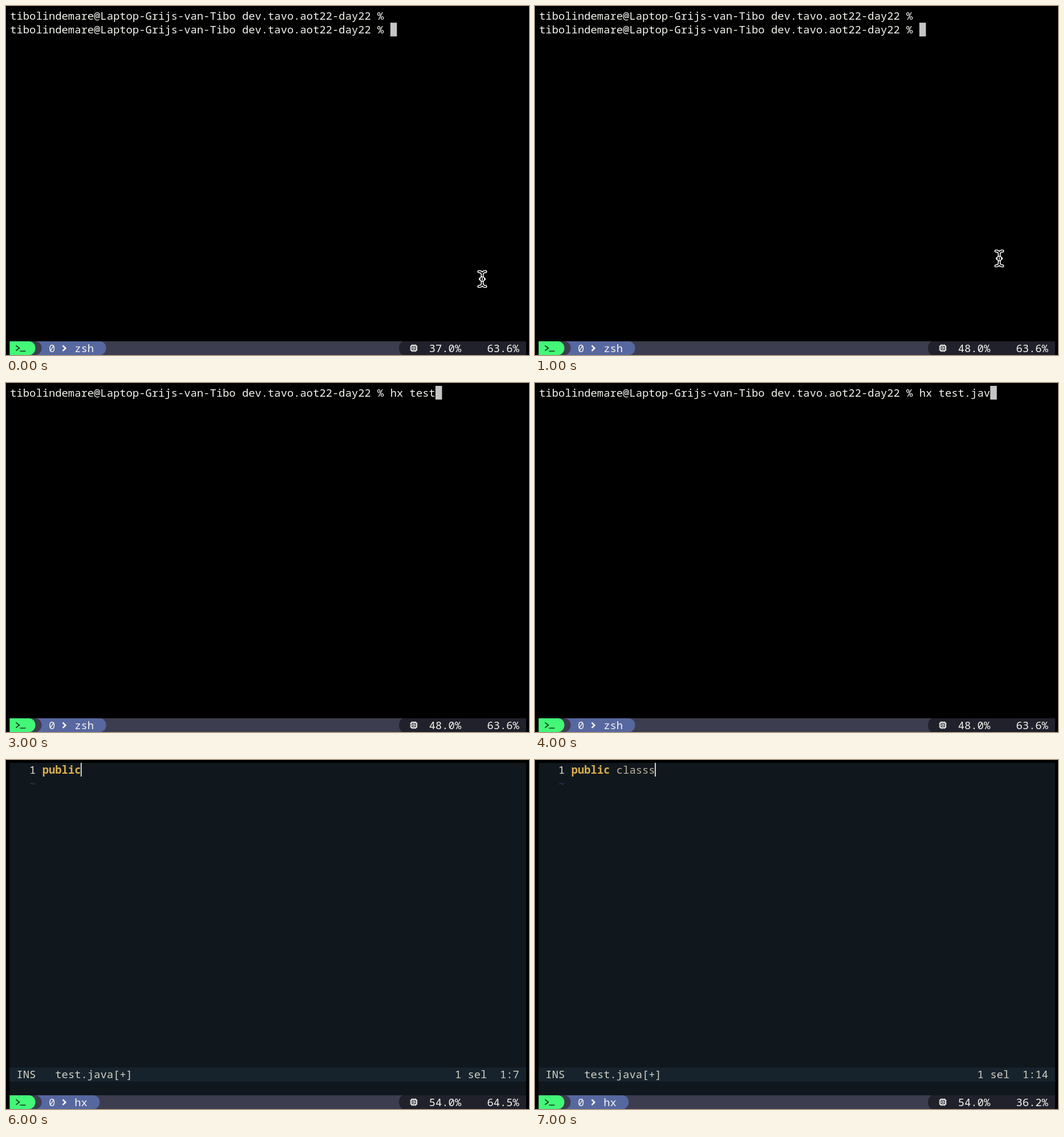
Write an HTML page that moves like this. It is 917 px wide and 611 px high and loops after 8000 ms.

```html
<!DOCTYPE html>
<html lang="en">
<head>
<meta charset="utf-8">
<title>Terminal</title>
<style>
  html, body { margin: 0; width: 100%; height: 100%; overflow: hidden; background: #000; }
  svg { display: block; width: 917px; height: 611px; }
  text { font: 18.83px "Noto Sans Mono", "DejaVu Sans Mono", monospace; white-space: pre; }
  .bold { font-weight: 700; }
</style>
</head>
<body>
<svg id="stage" viewBox="0 0 917 611"></svg>
<script>
const CELL = 11.3, ROW = 24.25, LEFT = 7.2, TOP = 5;
const LOOP = 8000;
const PROMPT = 'tibolindemare@Laptop-Grijs-van-Tibo dev.tavo.aot22-day22 % ';

// Each step holds until the next one; values carry over.
const STEPS = [
  { at: 0, lines: ['', ''], mouse: [835, 478], tab: 'zsh', cpu: '37.0%', ram: '63.6%' },
  { at: 1000, mouse: [814, 442], cpu: '48.0%' },
  { at: 2000, lines: [''] },
  { at: 3000, lines: ['hx test'], mouse: null },
  { at: 4000, lines: ['hx test.jav'] },
  { at: 5000, code: '', ram: '64.5%' },
  { at: 6000, code: 'public', tab: 'hx', cpu: '54.0%' },
  { at: 7000, code: 'public classs', ram: '36.2%' }
];

const stage = document.getElementById('stage');
const colX = c => LEFT + c * CELL;
const rowY = r => TOP + r * ROW;

const rect = (x, y, w, h, fill) =>
  `<rect x="${x}" y="${y}" width="${w}" height="${h}" fill="${fill}"/>`;
const text = (col, row, str, fill = '#f4f4ee', cls = '') =>
  `<text x="${colX(col)}" y="${rowY(row) + 18.8}" fill="${fill}" class="${cls}">${str}</text>`;
const line = (d, color, width) =>
  `<path d="${d}" fill="none" stroke="${color}" stroke-width="${width}"/>`;

// Bar segment with a rounded right end.
const pill = (x, end, fill) =>
  `<path d="M${x} 587H${end - 11}a11 12 0 0 1 0 24H${x}z" fill="${fill}"/>`;

function shell(lines) {
  const last = lines.length - 1;
  return lines.map((cmd, i) => text(0, i, PROMPT + cmd)).join('') +
    rect(colX(PROMPT.length + lines[last].length), rowY(last), 11.5, 24, '#c6c5c4');
}

function editor(code) {
  const ink = '#d2d1c5';
  const pos = `1 sel  1:${code.length + 1}`;
  const [word, rest] = [code.slice(0, 6), code.slice(6)];
  return rect(6.5, 5, 905.5, 582, '#10171d') +
    rect(6.5, rowY(22), 905.5, 24.5, '#17232c') +
    text(3, 0, '1', '#e2e1d8') + text(3, 1, '~', '#38404a') +
    text(5, 0, word, '#d9ae4c', 'bold') + text(11, 0, rest, '#b9b29b') +
    rect(colX(5 + code.length) - 0.7, 5, 2, 24, '#d8d8d4') +
    text(1, 22, 'INS', ink) +
    text(7, 22, 'test.java' + (code ? '[+]' : ''), ink) +
    text(79 - pos.length, 22, pos, ink);
}

function chip() {
  let pins = '';
  for (const d of [-3, 0, 3])
    pins += `M${715 + d} 592.5v13M708.5 ${599 + d}h13`;
  return line(pins, '#f4f4ee', 1.3) +
    '<rect x="710.5" y="594.5" width="9" height="9" rx="1" fill="#20212b" stroke="#f4f4ee" stroke-width="1.8"/>' +
    '<rect x="713.4" y="597.4" width="3.2" height="3.2" fill="none" stroke="#f4f4ee" stroke-width="1.3"/>';
}

function statusBar({ tab, cpu, ram }) {
  return rect(6.5, 587, 905.5, 24, '#3c3d4e') +
    pill(40, colX(11.9 + tab.length), '#5767a0') +
    pill(40, 62.5, '#3c3d4e') +
    pill(6.5, 51.5, '#43f777') +
    line('M17.5 594.5l6 4.5-6 4.5M24.5 604.2h10', '#18351f', 1.6) +
    text(6, 24, '0') + text(10, 24, tab) +
    line('M99.5 594.5l4.8 4.7-4.8 4.7', '#f4f4ee', 2.6) +
    '<path d="M912 587H697a8 12 0 0 0 0 24H912z" fill="#20212b"/>' +
    chip() + text(65, 24, cpu) + text(74, 24, ram);
}

function pointer([x, y]) {
  const d = 'M-6-13Q-1-13 0-9Q1-13 6-13M-6 13Q-1 13 0 9Q1 13 6 13M0-9V9M-3.5 0H3.5';
  return `<g transform="translate(${x} ${y})" stroke-linecap="round">` +
    line(d, '#fff', 5) + line(d, '#000', 1.8) +
    '<circle r="4" fill="#000" stroke="#fff" stroke-width="1.6"/>' +
    line('M0-2V2', '#fff', 1.4) + '</g>';
}

function draw(s) {
  stage.innerHTML = (s.code === undefined ? shell(s.lines) : editor(s.code)) +
    statusBar(s) + (s.mouse ? pointer(s.mouse) : '');
}

let shown = -1;
function tick() {
  const t = performance.now() % LOOP;
  const n = STEPS.filter(s => s.at <= t).length;
  if (n !== shown) {
    shown = n;
    draw(Object.assign({}, ...STEPS.slice(0, n)));
  }
  requestAnimationFrame(tick);
}
tick();
</script>
</body>
</html>
```
